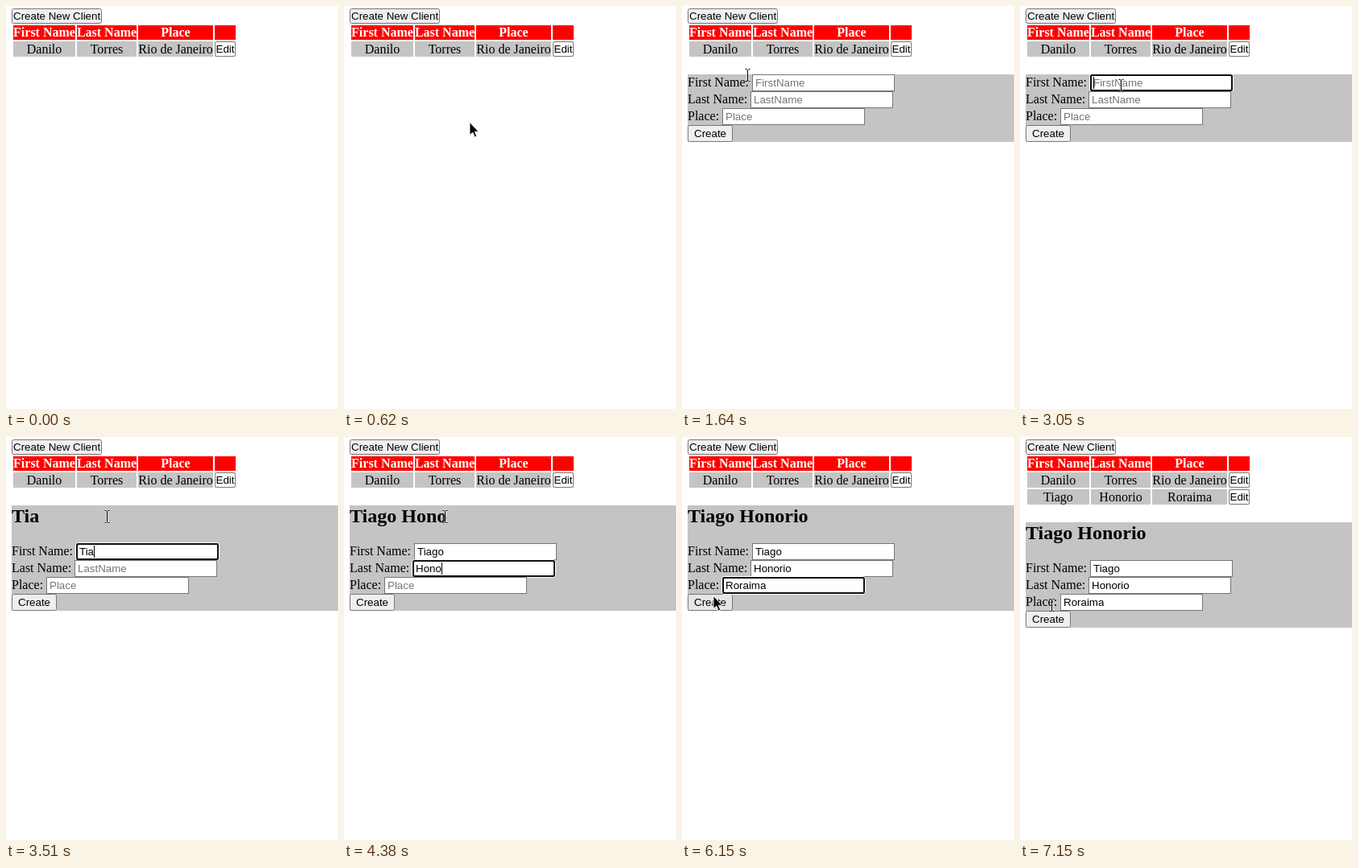
These frames come from a looping animation (412x501 px, 8 s). An HTML page:

```html
<!DOCTYPE html>
<html lang="en">
<head>
<meta charset="utf-8">
<title>Client form</title>
<style>
html, body { margin: 0; width: 100%; height: 100%; overflow: hidden; background: #fff; }
svg { display: block; width: 412px; height: 501px; }
text { white-space: pre; }
.serif { font: 16px "Liberation Serif", "Times New Roman", serif; }
.bold { font-weight: bold; }
.head { font-size: 24px; font-weight: bold; }
.sans { font: 13.333px "Liberation Sans", Arial, sans-serif; }
</style>
</head>
<body>
<svg id="stage" viewBox="0 0 412 501"></svg>
<script>
const LOOP = 8000, STEP = 70, GREY = '#c4c4c4', RED = '#ff0000';
const stage = document.getElementById('stage');
const pen = document.createElement('canvas').getContext('2d');
pen.font = '13.333px "Liberation Sans", Arial, sans-serif';

// word, key press times, focus span, field position
const fields = [
  { label: 'First Name:', hint: 'FirstName', word: 'Tiago', x: 87,
    keys: [3180, 3310, 3510, 3640, 3770], focus: [1990, 4030] },
  { label: 'Last Name:', hint: 'LastName', word: 'Honorio', x: 85,
    keys: every(4170, 7), focus: [4030, 4660] },
  { label: 'Place:', hint: 'Place', word: 'Roraima', x: 50,
    keys: every(4730, 7), focus: [4660, 7150] }
];
const columns = [[9, 77], [88, 74], [164, 93], [259, 26]];
const rest = { top: [89, 11], field: [125, 99], create: [39, 198], label: [39, 209] };
// time, x, y
const downPath = [[1360, 89, 11], [1500, 85, 50], [1640, 81, 86], [1710, 86, 114],
  [1780, 96, 133], [1850, 110, 122], [1920, 121, 106], [1990, 125, 99]];

function every(start, n) {
  return Array.from({ length: n }, (_, i) => start + i * STEP);
}

function rect(x, y, w, h, fill, more = '') {
  return `<rect x="${x}" y="${y}" width="${w}" height="${h}" fill="${fill}" ${more}/>`;
}

function text(s, x, y, cls, fill = '#000', anchor = 'start') {
  return `<text x="${x}" y="${y}" class="${cls}" fill="${fill}" text-anchor="${anchor}">${s}</text>`;
}

function button(s, x, y, w, h, pad, fill) {
  return rect(x + .5, y + .5, w - 1, h - 1, fill, 'rx="2" stroke="#767676"') +
    text(s, x + pad, y + (h + 9) / 2, 'sans');
}

function row(cells, y, h, fill, cls, ink) {
  return columns.map(([x, w], i) => rect(x, y, w, h, fill) +
    text(cells[i] || '', x + w / 2, y + Math.floor((h + 11) / 2), cls, ink, 'middle')).join('');
}

function client(cells, y) {
  return row(cells, y, 19, GREY, 'serif', '#000') + button('Edit', 259, y, 26, 19, 1.5, '#fff');
}

function field(f, y, t) {
  const value = typed(f, t), x = f.x, focused = t >= f.focus[0] && t < f.focus[1];
  let out = text(f.label, 7, y + 15, 'serif') +
    rect(x + .5, y + .5, 176, 20, '#fff', 'stroke="#767676"');
  if (focused) {
    out += rect(x - .5, y - .5, 178, 22, 'none', 'rx="3" stroke="#fff"') +
      rect(x + 1, y + 1, 175, 19, '#fff', 'rx="2" stroke="#101010" stroke-width="2"');
  }
  out += text(value || f.hint, x + 4, y + 15, 'sans', value ? '#000' : '#757575');
  const blinkedOff = (t >= 2520 && t < 3050) || t >= 6150;
  if (focused && !blinkedOff) {
    out += rect(x + 4 + Math.round(pen.measureText(value).width), y + 3, 1, 15, '#000');
  }
  return out;
}

function typed(f, t) {
  return f.word.slice(0, f.keys.filter(k => k <= t).length);
}

function form(t, y, hover) {
  const first = typed(fields[0], t), last = typed(fields[1], t);
  const lines = y + (first ? 47 : 0);
  return rect(7, y, 405, lines + 84 - y, GREY) +
    (first ? text(first + ' ' + last, 7, y + 21, 'serif head') : '') +
    button('Create', 7, lines + 63, 56, 21, 8, hover ? '#e5e5e5' : '#efefef') +
    fields.map((f, i) => field(f, lines + 21 * i, t)).join('');
}

function pointer(t) {
  if (t < 130) return null;
  if (t < 900) {
    const p = (Math.floor((t - 130) / STEP)) / 11;
    const e = p * p * (3 - 2 * p);
    return [313 + (rest.top[0] - 313) * e, 457 + (rest.top[1] - 457) * e];
  }
  if (t < 1430) return rest.top;
  if (t < 1990) {
    const q = 1430 + STEP * Math.floor((t - 1430) / STEP);
    const i = downPath.findIndex(k => k[0] > q);
    const a = downPath[i - 1], b = downPath[i], p = (q - a[0]) / (b[0] - a[0]);
    return [a[1] + (b[1] - a[1]) * p, a[2] + (b[2] - a[2]) * p];
  }
  return t < 6150 ? rest.field : t < 7150 ? rest.create : rest.label;
}

function cursor([x, y], beam) {
  const at = `transform="translate(${Math.round(x)} ${Math.round(y)})"`;
  if (!beam) {
    return `<path ${at} d="M0 -.5V15.5L3.7 12.2L6.3 18L8.8 16.9L6.3 11.2H11Z" fill="#000" stroke="#fff" stroke-width=".9"/>`;
  }
  const d = 'M-2.5 -7.5H-.5M1.5 -7.5H3.5M.5 -7V7M-2.5 7.5H-.5M1.5 7.5H3.5';
  return `<g ${at} fill="none"><path d="${d}" stroke="#fff" stroke-width="2.4" opacity=".6"/><path d="${d}" stroke="#000"/></g>`;
}

function glow([x, y]) {
  return `<circle cx="${x}" cy="${y}" r="11.5" fill="#f8ee70" style="mix-blend-mode:multiply"/>`;
}

function picture(t) {
  const at = pointer(t), saved = t >= 7150;
  const overNew = at && at[0] < 119 && at[1] < 22;
  const clicked = t >= 1160 && t < 1230;
  let out = rect(0, 0, 412, 501, '#fff') +
    button('Create New Client', 7, 3, 112, 19, 2, overNew && !clicked ? '#e5e5e5' : '#efefef') +
    row(['First Name', 'Last Name', 'Place'], 24, 18, RED, 'serif bold', '#fff') +
    client(['Danilo', 'Torres', 'Rio de Janeiro'], 44);
  if (saved) out += client(fields.map(f => f.word), 65);
  if (t >= 1230) out += form(t, saved ? 106 : 85, t >= 6150 && !saved);
  if (clicked || (t >= 1990 && t < 2120)) out += glow(at);
  if (at) {
    const overText = t >= 1430 && at[1] > 24 && (at[1] < 63 || at[1] > 84);
    out += cursor(at, overText && !(t >= 6150 && !saved));
  }
  return out;
}

let shown = '';
const start = performance.now();
function draw(now) {
  const next = picture(Math.max(0, now - start) % LOOP);
  if (next !== shown) stage.innerHTML = shown = next;
  requestAnimationFrame(draw);
}
draw(start);
</script>
</body>
</html>
```
